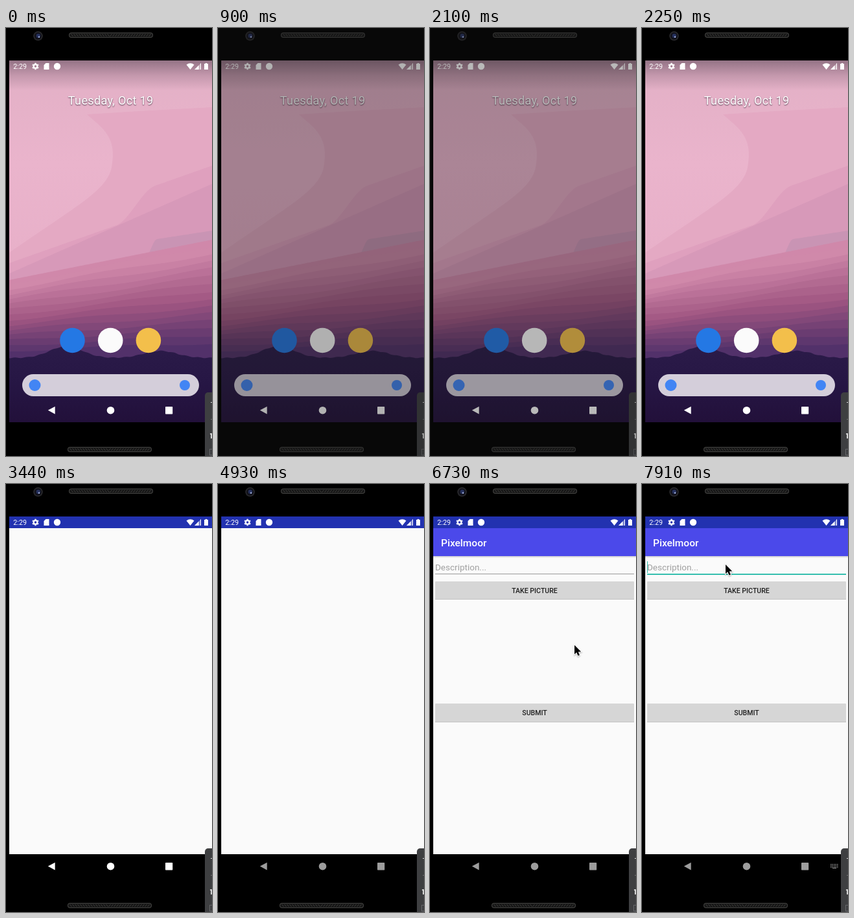
An HTML page with a canvas for the animation above (8000 ms loop, 318 by 659 pixels).

```html
<!DOCTYPE html>
<html lang="en">
<head>
<meta charset="utf-8">
<title>Phone demo</title>
<style>
  html, body { margin: 0; width: 100%; height: 100%; overflow: hidden; background: #000; }
  canvas { display: block; width: 318px; height: 659px; }
</style>
</head>
<body>
<canvas id="stage" width="318" height="659"></canvas>
<script>
const ctx = document.getElementById('stage').getContext('2d');
const LOOP = 8000, TICK = 148;
const FONT = 'Roboto, sans-serif';
const SCREEN = { left: 5, top: 50, right: 318, bottom: 607 };

const clamp = v => Math.min(1, Math.max(0, v));
const smooth = v => (v = clamp(v), v * v * (3 - 2 * v));
const lerp = (a, b, u) => a + (b - a) * u;
const ticks = (t, start) => Math.floor((t - start) / TICK);
// Progress that makes its first of n moves at the start
const stepped = (t, start, n) => clamp((ticks(t, start) + 1) / n);

function dimLevel(t) {
  const fadeIn = 1 - (1 - stepped(t, 900, 3)) ** 2;
  return fadeIn - stepped(t, 2100, 2);
}

// A fast sweep up and left that overshoots and settles
function pointerTip(t) {
  const n = clamp(ticks(t, 6730) / 5);
  const remaining = 1 - smooth(n * 1.39);
  const dip = 26 * Math.sin(Math.PI * n ** .75);
  return [128 + 94 * remaining, 123 + 124 * remaining - dip];
}

function rect(x, y, w, h, fill) {
  ctx.fillStyle = fill;
  ctx.fillRect(x, y, w, h);
}

function disc(x, y, r, fill) {
  ctx.fillStyle = fill;
  ctx.beginPath();
  ctx.arc(x, y, r, 0, Math.PI * 2);
  ctx.fill();
}

function rounded(x, y, w, h, r, fill) {
  ctx.fillStyle = fill;
  ctx.beginPath();
  ctx.roundRect(x, y, w, h, r);
  ctx.fill();
}

function shape(path, fill) {
  ctx.fillStyle = fill;
  ctx.fill(new Path2D(path));
}

function text(str, x, y, size, fill, weight = 400, align = 'left') {
  ctx.font = `${weight} ${size}px ${FONT}`;
  ctx.textAlign = align;
  ctx.fillStyle = fill;
  ctx.fillText(str, x, y);
}

function fade(y0, y1, ...stops) {
  const g = ctx.createLinearGradient(0, y0, 0, y1);
  stops.forEach((c, i) => g.addColorStop(i / (stops.length - 1), c));
  return g;
}

function mix(from, to, u) {
  return `rgb(${from.map((c, i) => Math.round(lerp(c, to[i], u)))})`;
}

// Fills the screen below the curve y = edge(x, u), u running 0..1 across
function below(fill, edge) {
  const { left, right, bottom } = SCREEN;
  ctx.fillStyle = fill;
  ctx.beginPath();
  ctx.moveTo(left, bottom);
  for (let x = left; x <= right + 3; x += 3) ctx.lineTo(x, edge(x, (x - left) / (right - left)));
  ctx.lineTo(right, bottom);
  ctx.fill();
}

function dusk(u) {
  const rose = [208, 137, 170], plum = [160, 86, 130], violet = [82, 49, 106];
  return u < .5 ? mix(rose, plum, u * 2) : mix(plum, violet, u * 2 - 1);
}

function wallpaper() {
  rect(5, 50, 313, 557, fade(68, 350, '#e3b0c6', '#eab4cc', '#e8b0c9'));
  shape('M318 122 L205 128 L125 133 C150 155 172 168 163 215 C155 250 115 270 5 346 V420 H318 Z', '#e4a9c3');
  below('#dfa0be', (x, u) => 362 - 110 * u - 40 * smooth((x - 170) / 60));
  below('#d799b9', (x, u) => 378 - 138 * u);
  below('#c994b4', (x, u) => 390 - 48 * u - 30 * smooth((x - 213) / 20));
  below('#d088aa', (x, u) => 388 - 62 * u);

  const bands = 14;
  for (let i = 0; i < bands; i++) {
    const depth = i / (bands - 1), slant = lerp(58, 12, depth);
    below(dusk(depth), (x, u) => lerp(394, 497, depth) - slant * u + 2 * Math.sin(x / 40 + i));
  }

  const peak = (x, center, width, height) => height * Math.exp(-(((x - center) / width) ** 2));
  below(fade(490, 607, '#2b1b49', '#261644', '#22103a'), x =>
    508 - peak(x, 93, 36, 18) - peak(x, 238, 36, 11) + .6 * Math.sin(x / 3));
  rect(5, 50, 313, 46, fade(50, 96, 'rgba(70,55,70,.5)', 'rgba(70,55,70,.2)', 'rgba(70,55,70,0)'));
}

function home() {
  wallpaper();
  ctx.save();
  ctx.shadowColor = 'rgba(50,30,50,.85)';
  ctx.shadowBlur = 2;
  ctx.shadowOffsetY = 1;
  ctx.letterSpacing = '.35px';
  text('Tuesday, Oct 19', 161.7, 118, 18, '#fff', 400, 'center');
  ctx.restore();
  ['#2478e4', '#fbfbfb', '#f3bf4b'].forEach((c, i) => disc(102.5 + i * 58.7, 481, 19.3, c));
  rounded(25, 533, 273, 34, 17, '#d4ceda');
  disc(44.5, 550, 9, '#4285f4');
  disc(276, 550, 8, '#4285f4');
}

function button(label, y, h) {
  rect(8, y + 1, 307, h, '#c4c4c4');
  rounded(8, y, 307, h, 1, '#d6d6d6');
  text(label, 161.5, y + h / 2 + 4, 10.6, '#202020', 500, 'center');
}

function form(t) {
  const enter = stepped(t, 5830, 2), focused = t >= 7620;
  ctx.save();
  ctx.beginPath();
  ctx.rect(5, 68, 313, 502);
  ctx.clip();
  ctx.globalAlpha = lerp(.5, 1, enter);
  ctx.translate(0, -20 * (1 - enter));
  rect(5, 111, 313, 3, fade(111, 114, '#c9c9cf', '#fafafa'));
  rect(5, 58, 313, 53, '#4b49ea');
  text('Pixelmoor', 17, 96, 15.5, '#fff', 500);
  text('Description...', 8, 133, 13.5, '#a0a0a0');
  if (focused) rect(8, 138, 307, 2, '#35bfae');
  else rect(8, 138, 307, 1, '#9b9b9b');
  if (t >= 7770) rect(8, 119, 1, 18, '#35bfae');
  button('TAKE PICTURE', 150, 27);
  button('SUBMIT', 338, 28);
  ctx.restore();
}

function app(t) {
  rect(5, 50, 313, 18, '#2232b0');
  rect(5, 68, 313, 502, '#fafafa');
  if (t >= 5830) form(t);
}

function gear(x, y) {
  ctx.strokeStyle = '#fff';
  ctx.lineWidth = 2.2;
  ctx.beginPath();
  ctx.arc(x, y, 2.9, 0, Math.PI * 2);
  for (let i = 0; i < 6; i++) {
    const a = (i + .5) * Math.PI / 3, c = Math.cos(a), s = Math.sin(a);
    ctx.moveTo(x + c * 3.4, y + s * 3.4);
    ctx.lineTo(x + c * 5.3, y + s * 5.3);
  }
  ctx.stroke();
}

function statusBar() {
  text('2:29', 11.3, 63, 10.7, '#fff');
  gear(45.5, 59);
  shape('M58.5 57 l3 -3 h5 v10 h-8 z', '#fff');
  disc(79, 59, 5.2, '#fff');
  shape('M284.5 64 l-6 -7.5 q6 -4.5 12 0 z', '#fff');
  shape('M291 64 l10 -10 v10 z', 'rgba(255,255,255,.4)');
  shape('M291 64 l6.5 -6.5 v6.5 z M300 55 l1 -1 v10 h-1 z', '#fff');
  shape('M306 55 h1.8 v-1 h2.4 v1 h1.8 v9 h-6 z', '#fff');
}

function navBar(t) {
  const tint = mix([255, 255, 255], [157, 157, 157], stepped(t, 4040, 5));
  shape('M64.8 588.6 l10.9 -5.8 v11.8 z', tint);
  disc(161.5, 588.7, 5.8, tint);
  rounded(246, 583, 11.2, 11.5, .8, tint);
  if (t >= 7770) keyboardIcon();
}

function keyboardIcon() {
  for (let i = 0; i < 15; i++)
    rect(291 + (i % 5) * 2.5, 585 + Math.floor(i / 5) * 2.2, 1.5, 1.3, '#8c8c8c');
  rect(294, 591, 6, 1, '#8c8c8c');
}

function speaker(x, y) {
  rounded(x, y, 130, 8, 4, '#454543');
  rounded(x + 1, y + 1, 128, 6, 3, '#171717');
  ctx.strokeStyle = '#3b3b39';
  ctx.lineWidth = 1;
  ctx.beginPath();
  for (let i = 5; i < 126; i += 4) {
    const lean = i < 65 ? 1.5 : -1.5;
    ctx.moveTo(x + i - lean, y + 2);
    ctx.lineTo(x + i + lean, y + 6);
  }
  ctx.stroke();
}

function hardware() {
  rect(0, 0, 318, 659, '#000');
  disc(49.5, 12.3, 7.3, '#28282b');
  disc(49.5, 12.3, 5.5, '#111119');
  disc(49.8, 12, 3.2, '#25305c');
  disc(51, 13.7, 1.2, '#a5b3df');
  speaker(97, 7);
  speaker(95, 645);
}

function sidePanel() {
  rounded(307, 561, 20, 105, 5, '#3e3f41');
  rect(316, 576, 2, 1, '#d8d8d8');
  rect(316, 602, 2, 1, '#707070');
  shape('M315 624 h3 v8 h-2 v-6 h-1 z', '#d0d0d0');
  ctx.strokeStyle = '#66676a';
  ctx.lineWidth = 1;
  ctx.strokeRect(314.5, 648.5, 8, 9);
}

function pointer(x, y) {
  const arrow = new Path2D('M1 1 V15.2 L4.2 12.3 L6.5 17.6 L9 16.5 L6.8 11.4 L11.2 11.2 Z');
  ctx.save();
  ctx.translate(Math.round(x), Math.round(y));
  ctx.shadowColor = 'rgba(0,0,0,.3)';
  ctx.shadowBlur = 2;
  ctx.shadowOffsetY = 1;
  ctx.strokeStyle = '#fff';
  ctx.lineWidth = 2;
  ctx.stroke(arrow);
  ctx.shadowColor = 'transparent';
  ctx.fillStyle = '#000';
  ctx.fill(arrow);
  ctx.restore();
}

function draw(now) {
  const t = now % LOOP;
  hardware();
  if (t < 3440) home();
  else app(t);
  statusBar();
  navBar(t);
  sidePanel();
  rect(0, 0, 318, 659, `rgba(24,24,24,${.6 * dimLevel(t)})`);
  if (t >= 6730) pointer(...pointerTip(t));
}

const begin = performance.now();
function tick() {
  draw(performance.now() - begin);
  requestAnimationFrame(tick);
}
tick();
</script>
</body>
</html>
```
